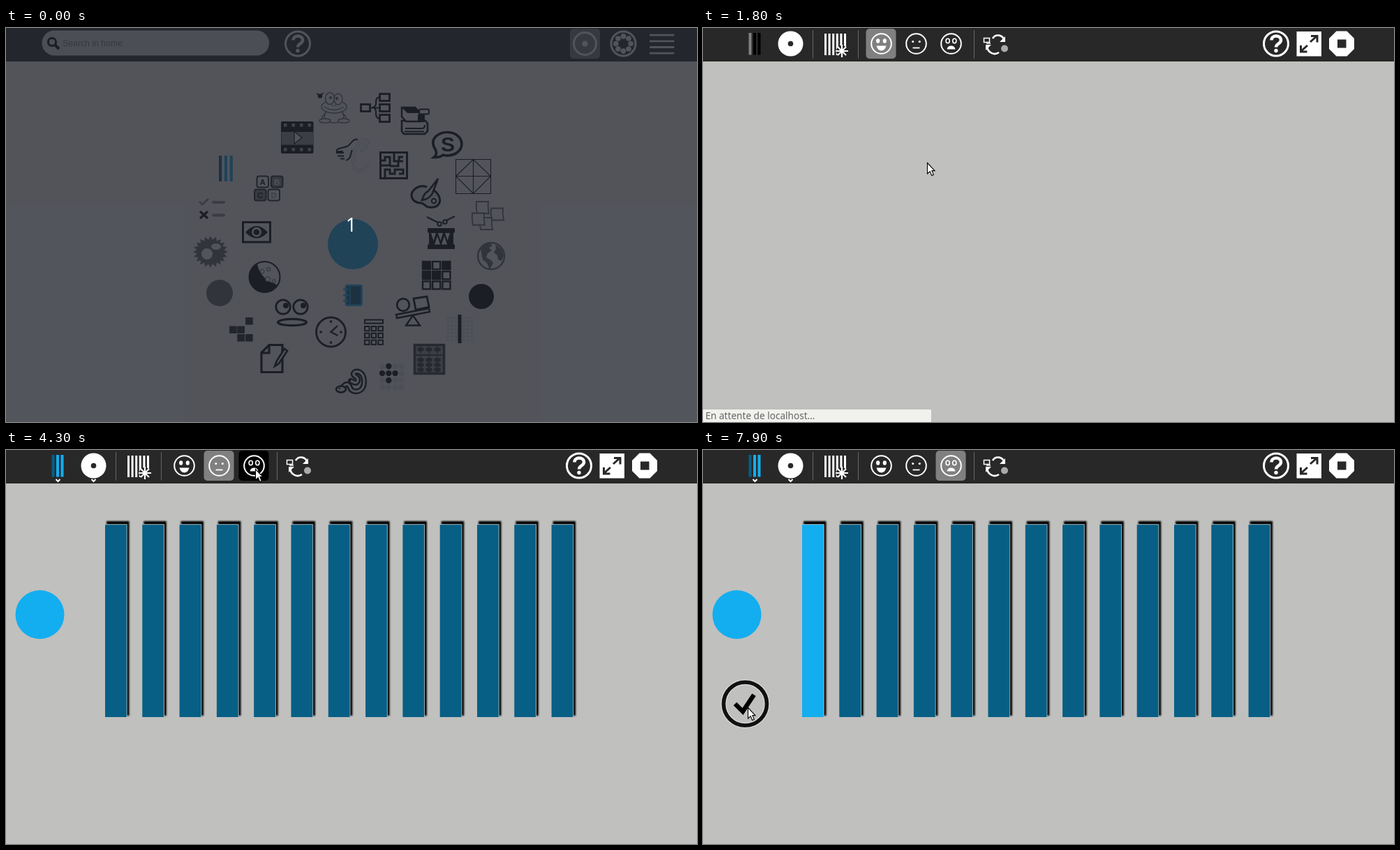
Animation of 990x565 px, one loop 8 s. Source, as an HTML page:

```html
<!DOCTYPE html>
<html lang="fr">
<head>
<meta charset="utf-8">
<title>Jeu de barres</title>
<style>
html, body { margin: 0; width: 100%; height: 100%; overflow: hidden; background: #282828; }
svg { display: block; width: 100vw; height: 100vh; }
.arial { font-family: "Liberation Sans", Arial, sans-serif; }
.noto { font-family: "Noto Sans", sans-serif; }
</style>
</head>
<body>
<svg id="stage" viewBox="0 0 990 565"></svg>
<script>
const DARK = '#075f86', BLUE = '#13aef0', BAR = '#282828', GREY = '#808080', PAPER = '#fefefd', INK = '#666';

// Shape helpers
const line = (c, w = 3) => `fill="none" stroke="${c}" stroke-width="${w}"`;
const full = (f, c, w) => `fill="${f}" stroke="${c}" stroke-width="${w}"`;
const fill = c => `fill="${c}"`;
const rect = (x, y, w, h, a = '', r = 0) => `<rect x="${x}" y="${y}" width="${w}" height="${h}" rx="${r}" ${a}/>`;
const circle = (x, y, r, a = '') => `<circle cx="${x}" cy="${y}" r="${r}" ${a}/>`;
const oval = (x, y, rx, ry, a = '') => `<ellipse cx="${x}" cy="${y}" rx="${rx}" ry="${ry}" ${a}/>`;
const path = (d, a = '') => `<path d="${d}" ${a}/>`;
const text = (x, y, size, s, a, font = 'arial') => `<text x="${x}" y="${y}" font-size="${size}" class="${font}" ${a}>${s}</text>`;
const group = (id, s, a = '') => `<g id="${id}" ${a}>${s}</g>`;
const at = (x, y, s) => `<g transform="translate(${x} ${y})">${s}</g>`;
const times = (n, f) => Array.from({ length: n }, (_, i) => f(i)).join('');
const grid = (cols, rows, f) => times(rows, j => times(cols, i => f(i, j)));

const help = x => at(x, 22.5,
  circle(0, 0, 17.5, line('#fff')) +
  path('M-6.5-5C-6.5-13 7-13 7-5C7 0 0 0 0 5', line('#fff', 4.5)) + circle(0, 10, 2.7, fill('#fff')));

const homeBar = () =>
  rect(0, 0, 990, 48, fill(BAR)) +
  rect(51.5, 3.5, 325.5, 36, fill('#e5e5e5'), 18) +
  circle(66, 20, 5.6, line('#000')) + path('M70 24L76 30', line('#000', 4)) +
  text(81, 26, 12.3, 'Search in home', fill('#777')) +
  help(418) +
  rect(808, 1, 43, 43, fill(GREY), 5) +
  circle(829.5, 22.5, 16, line('#fff')) + circle(829.5, 22.5, 4.3, fill('#fff')) +
  circle(884.5, 22.5, 17.5, line('#fff')) +
  times(8, i => circle(884.5 + 10.6 * Math.cos(i * Math.PI / 4), 22.5 + 10.6 * Math.sin(i * Math.PI / 4), 3.8, fill('#fff'))) +
  times(4, i => rect(922, 8.7 + 8.7 * i, 35.5, 2.8, fill('#fff'), 1));

const frog = () =>
  circle(450, 97.5, 3.2) + path('M445 94l5 3l5-4', line('#000', 1.5)) +
  oval(470, 126, 14, 10, full(PAPER, INK, 1.4)) +
  oval(470, 113, 18, 9, full(PAPER, INK, 1.4)) +
  oval(464, 101, 6.5, 8.5, full(PAPER, INK, 1.4)) + oval(476, 102, 6, 8, full(PAPER, INK, 1.4)) +
  circle(465, 100, 2.2, fill(INK)) + circle(474, 101, 2.2, fill(INK)) +
  path('M456 113q14 9 28 0M468 110v2M472 110v2M458 123q-8 4-4 9M482 123q8 4 4 9', line(INK, 1.4)) +
  oval(457, 133, 8, 3, full(PAPER, INK, 1.3)) + oval(484, 133, 8, 3, full(PAPER, INK, 1.3));

const mindMap = () =>
  rect(508.5, 109.5, 13, 10, line('#000', 2.8)) +
  times(3, i => rect(535.5, 94.5 + 15 * i, 14, 10, line('#000', 2.8))) +
  path('M522 114.5h13M525 114q6-1 5-8q0-6 5-7M525 114q6 1 5 9q0 6 5 7', line('#000', 2.2));

const tank = () =>
  path('M567 133h34l3 4v11l-4 4h-30l-3-4z', full(PAPER, '#000', 2.6)) +
  path('M572 144h24q4 0 4-5M571 148.500h28', line('#000', 2)) +
  path('M567 114h19l7 7v13h-20l-6-7z', full(PAPER, '#000', 2.4)) +
  path('M567 114h19l7 8h-18zM590 124h10v11h-10z') +
  rect(592, 116.5, 14, 7, full(PAPER, '#000', 2), 2);

const bubble = () =>
  path('M615 174C605 158 621 149 633 149.500C659 151 660 181 633 183Q629 183 626 182Q622 186 613 185.500Q619 181 615 174Z', line('#000', 3.6)) +
  text(633, 177, 30, 'S', 'font-weight="bold" text-anchor="middle"');

const tangram = () => path('M644.5 188.500h50v49h-50zM644.5 212.500h50M669.5 188.500v49M644.5 212.500l25-24l25 24l-25 25z', line('#000', 1.1));

const notes = () => [[674, 249], [695, 258.5], [679, 272], [668, 265.5]].map(([x, y]) =>
  path(`M${x} ${y}h17q-1 9 1 17h-17q-2-8-1-17z`, full(PAPER, INK, 1.8))).join('');

const globe = () =>
  circle(695, 327, 19, line(INK, 2.4)) +
  path('M680 317q5-8 14-8l3 3l-5 3l4 4l-6 4l-2 6l7 4l3 4l-5 9l-4-9l-6-5z', fill(INK)) +
  path('M701 311q10 4 12 15l-3 8l-5-2l-1-6l-5-4l3-5z', fill(INK));

const dotBar = () =>
  grid(7, 7, (i, j) => circle(633 + 5.7 * i, 416 + 5.3 * j, 2, fill('#e7e7e7'))) + rect(647.5, 411, 5, 41);

const abacus = () =>
  rect(585.5, 454.5, 42, 41, full('#999', '#333', 3.5)) +
  path('M586 469h41', line('#333', 2)) +
  times(3, i => path(`M${594 + 12 * i} 456v39`, line('#333', 1.2)) +
    [461, 476, 483, 490].map(y => oval(594 + 12 * i, y, 5, 3.2, fill('#333'))).join(''));

const life = () => grid(4, 4, (i, j) => {
  const on = (i === 1 && j < 3) || (j === 1 && i < 3);
  return circle(539 + 9.3 * i, 485 + 10.1 * j, 4.2, fill(on ? '#000' : '#e9e9e9'));
});

const snake = () => {
  const d = 'M481 517C487 508 491 510 493 516C496 524 513 524 513 507C513 492 501 490 498 495C496 500 506 499 504 506C502 511 498 508 494 506';
  return path(d, line('#000', 8) + ' stroke-linecap="round"') + path(d, line(PAPER, 3.2)) +
    oval(480, 518, 7, 4.5, full(PAPER, '#000', 2.6)) + circle(478, 517, 1.3);
};

const write = () =>
  path('M377 454.500h19v39h-30v-28zM377 455v11h-11', line('#000', 3.2)) +
  path('M385 485l3-8l11-17l4 3l-12 18z', full(PAPER, '#000', 2.6)) + path('M384 487l2-6l3 3z');

const burst = () => {
  let d = '';
  for (let i = 0; i < 40; i++) {
    const a = i * Math.PI / 20, r = i % 2 ? 19.5 : 25;
    d += `${i ? 'L' : 'M'}${(293 + r * Math.cos(a)).toFixed(1)} ${(321 + .9 * r * Math.sin(a)).toFixed(1)}`;
  }
  return path(d + 'z', fill(INK)) + circle(288, 324, 8, fill(PAPER)) + oval(301, 313.5, 7, 4.5, fill(PAPER));
};

const todo = () =>
  path('M277 249l4 4l9-8', line('#919191', 3)) +
  path('M297 250h15M297 268.500h15', line('#919191', 4) + ' stroke-linecap="round"') +
  path('M278 263l11 10M289 263l-11 10', line('#000', 3.2));

const threeBars = () => [DARK, BLUE, BLUE].map((c, i) => rect(305 + 7.8 * i, 183, 4.2, 37, fill(c))).join('');

const letters = () => [['A', 359.5, 212.5, '#fff', '#000'], ['B', 380, 212.5, '#858585', '#fff'], ['C', 356, 231.5, '#858585', '#000'], ['D', 375.5, 231.5, '#fff', '#999']]
  .map(([s, x, y, bg, ink]) => rect(x, y, 16.5, 16, full(bg, '#222', 2), 3) +
    text(x + 8.2, y + 12, 11.5, s, fill(ink) + ' font-weight="bold" text-anchor="middle"')).join('');

const film = () =>
  rect(394, 134, 46.5, 46, '', 2) + rect(394.5, 149, 45.5, 18.5, fill('#979797')) +
  grid(4, 2, (i, j) => rect(398 + 11.5 * i, 137 + 35 * j, 4.5, 4.5, fill('#aaa'))) +
  path('M413 148.500l11 8.700l-11 8.700z', full('#fff', '#000', 1.2));

const hand = () => {
  const script = 'M507 176C516 176 521 161 514 161C504 161 494 184 499 198C503 209 515 205 518 193';
  return path(script, line('#aaa', 4.6) + ' stroke-dasharray="1.6 1"') + path(script, line(PAPER, 3)) +
    path('M504 160C496 158 494 168 488 170L477 173q-4 1-3 4h9M488 170M473 179h11M475 183.500h9M479 187.500h6M487 190C495 188 493 180 496 175', line('#000', 2));
};

const maze = () => path('M536.5 178.500h38v37h-38zM536 190h7v-5h7v12h-13M556 178v13h7v-6h6M569 191h-7v7h-12M543 216v-13h7v6h7v-6h12v6h-6', line('#000', 3));

const palette = () =>
  path('M612 232C627 242 624 259 607 257C600 257 600 251 594 251C580 250 577 237 587 230C592 226 599 226 603 228', full('#eee', '#000', 3)) +
  circle(613, 248, 3.2, full(PAPER, '#000', 2)) +
  path('M596 247q3-11 9-13l14-18l-8 21q-4 8-15 10z', full('#eee', '#000', 2.6));

const drum = () =>
  path('M604 287h39v6l-2 1v16l2 1v6h-39v-6l2-1v-16l-2-1z') +
  times(3, i => path(`M${609 + 10 * i} 294h7l-3.500 11z`, fill(PAPER))) +
  times(2, i => path(`M${614 + 10 * i} 310.500h8l-4-12z`, fill(PAPER))) +
  path('M603 271l18 9M643 270l-18 9', line('#000', 2)) +
  circle(621, 281, 2.8, full(PAPER, '#000', 2)) + circle(629, 278, 2.8, full(PAPER, '#000', 2));

const cells = () => grid(3, 3, (i, j) => {
  const open = j === 2 || i === j + 1;
  return rect(597 + 14.2 * i, 335 + 14.2 * j, 11, 11, full(open ? PAPER : '#000', '#000', 2.4));
});

const balance = () =>
  circle(569, 397, 8.8, line('#000', 2.8)) +
  path('M584 388l19-3l3 15l-19 4z', line('#000', 2.8)) +
  path('M559 411l47-9l1 5l-47 9z', line('#000', 2.4)) + path('M583 412l10 14.500h-20z', line('#000', 2.4));

const calculator = () =>
  rect(514, 418.5, 26, 5, line('#000', 2)) +
  grid(3, 3, (i, j) => rect(514 + 9.7 * i, 428 + 9.8 * j, 6.5, 6.3, line('#000', 2)));

const clock = () =>
  circle(465.5, 436, 21, line('#000', 2.8)) +
  path('M475 427l-9.500 9l10 5', line('#000', 2.4)) +
  [[465.5, 421], [480, 436], [465.5, 451], [451, 436]].map(([x, y]) => rect(x - 1.6, y - 1.6, 3.2, 3.2)).join('');

const faceEyes = () => [397, 422].map(x =>
  circle(x, 400, 10.2, line('#000', 2.8)) + circle(x + 4, 398, 4)).join('') +
  oval(410, 422, 20.5, 4.6, line('#000', 3.2));

const moon = () =>
  circle(370.5, 357, 22, full(PAPER, '#000', 2)) +
  path('M360 337.500C361 348 368 357 376 363Q387 367 389 369A22 22 0 1 1 360 337.500z') +
  [[367, 349, 3], [376, 346, 2.6], [375, 360, 3.5], [384, 363, 2.4]].map(([x, y, r]) => circle(x, y, r, full(PAPER, '#555', 1))).join('');

const eye = () =>
  rect(339.5, 278.5, 39, 28.5, line('#000', 3)) +
  path('M343 293q16-18 32 0q-16 17-32 0z') + circle(359, 292.7, 5.6, full('#000', PAPER, 2.6));

const journal = () =>
  rect(487, 369, 22.5, 28.5, full(DARK, BLUE, 2.6), 2) + path('M493 369v28', line(BLUE, 1.6)) +
  times(3, i => path(`M483 ${375 + 8 * i}h8`, line(BLUE, 2.4)));

const home = () =>
  rect(0, 0, 990, 565, fill(PAPER)) + homeBar() +
  group('hover', rect(289, 174, 54, 54, fill('#d4d4d4'), 5)) +
  [frog, mindMap, tank, bubble, tangram, notes, globe, dotBar, abacus, life, snake, write, burst, todo, threeBars,
    letters, film, hand, maze, palette, drum, cells, balance, calculator, clock, faceEyes, moon, eye, journal].map(f => f()).join('') +
  [[343, 415], [320, 427.5], [331.3, 427.5], [331.3, 439], [343, 439]].map(([x, y]) => rect(x, y, 10.7, 10.5, fill('#222'))).join('') +
  circle(681, 385, 18) + circle(306, 380, 19, fill(INK)) +
  circle(497, 310, 36, fill(BLUE));

const face = (x, inner) => at(x, 22.5, circle(0, 0, 14.3, line('#fff', 2)) + inner);
const eyes = a => oval(-4.8, -4, 2.6, 3.2, a) + oval(4.8, -4, 2.6, 3.2, a);
const hint = x => path(`M${x - 3} 42l3 3l3-3`, line('#fff', 2));

const gameBar = () =>
  rect(0, 0, 990, 48, fill(BAR)) +
  times(3, i => rect(65.5 + 6.5 * i, 7, 4, 31.5, 'class="mini"')) +
  circle(125.5, 22.5, 18, fill('#fff')) + circle(125.5, 22.5, 3.8, fill(BAR)) +
  [157.5, 222.5, 388.5].map(x => path(`M${x} 3v40.500`, line('#666', 1))).join('') +
  times(6, i => rect(174 + 5.6 * i, 8, 3, 31, fill('#fff'))) +
  circle(199, 33, 8, fill(BAR)) + path('M199 24v18M190 33h18M193 27l12 12M205 27l-12 12', line('#fff', 2.2)) +
  times(3, i => rect(233.5 + 50 * i, 1, 43, 43, 'class="slot"', 5)) +
  face(255.5, eyes(fill('#fff')) + path('M-7 3h14q-2 7-7 7t-7-7z', fill('#fff'))) +
  face(305.5, circle(-4.8, -3, 1.6, fill('#fff')) + circle(4.8, -3, 1.6, fill('#fff')) + path('M-5 6h10', line('#fff', 1.8))) +
  face(355.5, eyes(line('#fff', 1.6)) + path('M-6 8q1-5 6-5t6 5z', fill('#fff'))) +
  path('M415 15C419 8 430 9 432 19M424 35C417 40 408 35 407 27', line('#fff', 2.6)) +
  path('M433 12v8h-8zM405 32v-8h8z', fill('#fff')) +
  rect(402.5, 14.5, 8, 6, line('#fff', 1.5)) + path('M406 22h6', line('#fff', 1.5)) + circle(432, 29.5, 5, fill('#aaa')) +
  help(821) +
  rect(850.5, 5, 35.5, 35.5, fill('#fff')) +
  path('M870 20l9-8M871 11.500h9v9M866 25l-9 8M856.5 25v9h9', line(BAR, 3)) +
  path('M907.5 4.500h15l10.500 10.500v15l-10.500 10.500h-15l-10.500-10.500v-15z', fill('#fff')) +
  rect(909, 16.5, 12.5, 12, fill(BAR));

const barX = i => 142 + 53.3 * i;
const game = () =>
  rect(0, 0, 990, 565, fill('#c0c0be')) + gameBar() +
  group('bars', hint(74.5) + hint(125.5) +
    `<g filter="url(#soft)">${times(13, i => rect(barX(i) + 2, 102, 32.5, 279))}</g>` +
    times(13, i => rect(barX(i), 107, 31, 276, i ? fill(DARK) : 'id="first"') +
      path(`M${barX(i)} 106.700h31.200v276`, line('#b8c4c8', .9)))) +
  group('player', circle(48.5, 236, 35, fill(BLUE))) +
  group('done', circle(60.5, 364, 31, line('#ddd', 8)) + circle(60.5, 364, 31, line('#111', 5.6)) +
    path('M46 364l11 11l16-24', line('#000', 6.5)));

const stage = document.getElementById('stage');
stage.innerHTML =
  '<defs><filter id="soft" x="-5%" y="-5%" width="110%" height="110%"><feGaussianBlur stdDeviation="1.3"/></filter></defs>' +
  group('home', home()) + group('game', game()) +
  group('status', path('M-1 546.500H325q2.500 0 2.500 2.500V566H-1z', full('#f1f1ed', '#bbb', 1)) +
    text(3.5, 561, 13.6, 'En attente de localhost…', fill('#666'), 'noto')) +
  group('veil', rect(0, 0, 990, 565, fill('rgba(36,39,48,.79)')) +
    text(494.5, 292, 27, '1', fill('#fff') + ' text-anchor="middle"', 'noto')) +
  group('cursor', path('M.5 .5V16L4.2 12.600L6.700 18.500L9.300 17.400L6.900 11.600H11z', full('#fff', '#000', 1.1)));

const $ = id => document.getElementById(id);
const show = (id, on) => $(id).setAttribute('visibility', on ? 'visible' : 'hidden');
const minis = document.querySelectorAll('.mini'), slots = document.querySelectorAll('.slot');

// Pointer path: time, x, y
const route = [
  [600, 440, 320], [900, 321, 193], [2300, 321, 193], [2700, 326, 110], [3100, 305, 31], [3200, 300, 28],
  [3300, 300, 28], [3500, 403, 53], [3800, 403, 53], [3900, 313, 24], [4000, 313, 24], [4300, 357, 27],
  [4500, 357, 28], [4600, 430, 43], [5000, 430, 43], [5100, 348, 22], [5700, 348, 22], [6300, 138, 199],
  [6600, 138, 199], [7000, 152, 199], [7600, 152, 199], [7900, 64, 369], [8000, 64, 369]
];
const ease = k => k * k * (3 - 2 * k);

function pointer(t) {
  const i = Math.max(1, route.findIndex(p => p[0] > t));
  const [t0, x0, y0] = route[i - 1], [t1, x1, y1] = route[i];
  const k = ease(Math.max(0, (t - t0) / (t1 - t0)));
  return [x0 + (x1 - x0) * k, y0 + (y1 - y0) * k];
}

function slotColor(i, t) {
  const chosen = [t < 3900, t >= 3900 && t < 5300, t >= 5100][i];
  const hot = [false, t >= 3000 && t < 3400, t >= 4200 && t < 5100][i];
  return chosen ? GREY : hot ? '#000' : 'none';
}

function draw(ms) {
  const t = Math.floor(ms / 100) * 100;
  const playing = t >= 1800, joined = t >= 2300;
  $('home').style.display = playing ? 'none' : '';
  $('game').style.display = playing ? '' : 'none';
  show('veil', t < 500);
  show('hover', t >= 900 && !playing);
  show('status', t >= 1500 && !joined);
  show('bars', t >= 2000);
  show('player', joined);
  show('done', t >= 7200);
  $('first').setAttribute('fill', t >= 7200 ? BLUE : DARK);
  minis.forEach((m, i) => m.setAttribute('fill', joined ? (i ? BLUE : DARK) : (i ? '#000' : GREY)));
  slots.forEach((s, i) => s.setAttribute('fill', slotColor(i, t)));
  show('cursor', t >= 600);
  $('cursor').setAttribute('transform', `translate(${pointer(t).join(' ')})`);
}

const start = performance.now();
(function tick() {
  draw((performance.now() - start) % 8000);
  requestAnimationFrame(tick);
})();
</script>
</body>
</html>
```
